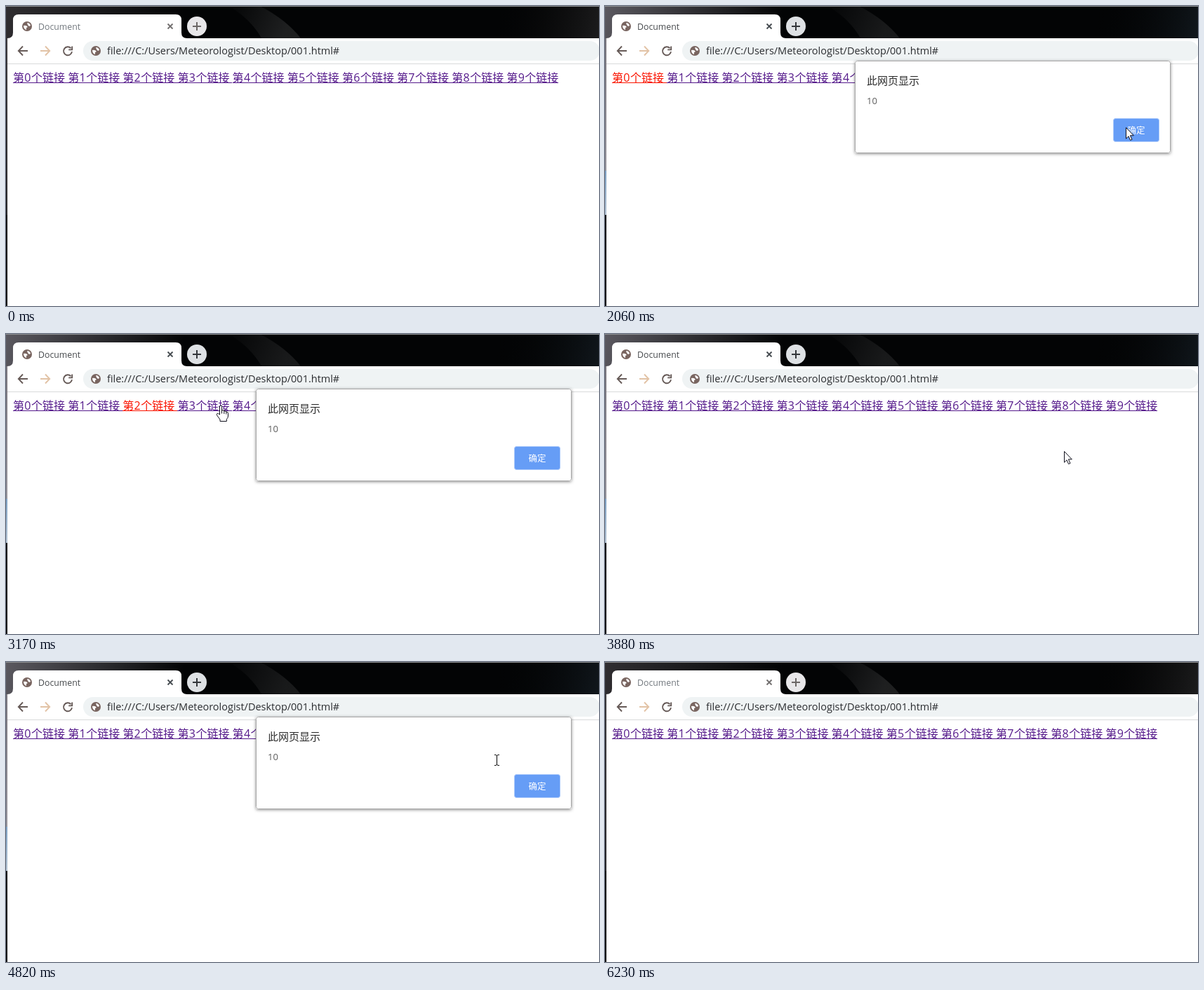
Recreate the animation shown at these times as an HTML page with a canvas. Size 845 px wide and 428 px high, loop 6.29 s.

```html
<!DOCTYPE html>
<html lang="zh">
<head>
<meta charset="utf-8">
<title>Document</title>
<style>
html, body { margin: 0; width: 100%; height: 100%; overflow: hidden; background: #fff; }
canvas { display: block; }
</style>
</head>
<body>
<canvas id="stage" width="845" height="428"></canvas>
<script>
const c = document.getElementById('stage').getContext('2d');
const LOOP = 6290, ENTER = 70, EXIT = 6080, BLUR = 6230;
const FADE = 190;
const LATIN = '"Open Sans", "Noto Sans", sans-serif';
const CJK = '"Noto Sans CJK SC", "Noto Sans CJK", sans-serif';
const LINK_X = 10, LINK_STEP = 78.15, LINK_Y = 101;
const OK = { x: 742, y: 173 };

// Each click on a link opens the dialog, each click on its button closes it
const visits = [
  { x: 63, open: 1260, close: 2200 },
  { x: 168, open: 2960, close: 3600 },
  { x: 526, open: 4370, close: 5120 },
  { x: 560, open: 5400, close: 5780 }
];

// The pointer enters, goes link - button for each visit, and leaves
const stops = [{ t: ENTER, x: 684, y: 407 }, { t: 670, x: 69, y: 128 }];
for (const { x, open, close } of visits) {
  stops.push(
    { t: open - 130, x, y: LINK_Y }, { t: open + 80, x, y: LINK_Y },
    { t: close - 150, ...OK }, { t: close, ...OK });
}
stops.push({ t: EXIT, x: 823, y: 428 });

const hand = new Path2D('M-1.5 13V1.5Q-1.5 0 0 0T1.5 1.5V7Q4.5 5.8 4.8 8Q7.6 7 7.9 9.2Q10.5 8.6 10.5 11.2V15Q10.5 17.5 8.4 19.5V22.5H-1V20L-5 14.6Q-6.6 12 -5 11.3Q-3.6 10.8 -1.5 13Z');
const arrow = new Path2D('M.5 .5V16.2L4 12.8L6.6 18.5L9 17.4L6.4 11.8H11.3Z');
const land = new Path2D('M-5 -1Q-1 -2 1 1L-1 2L-1 5Q-5 4 -5 -1ZM0 -5Q4 -5 5 -1L3 0L1 -2Z');

const clamp = v => Math.max(0, Math.min(1, v));
const mix = (a, b, u) => a + (b - a) * u;

function text(s, x, y, size, color, family = LATIN, weight = 400) {
  c.font = `${weight} ${size}px ${family}`;
  c.fillStyle = color;
  c.fillText(s, x, y);
}

function box(x, y, w, h, r, color) {
  c.beginPath();
  c.roundRect(x, y, w, h, r);
  c.fillStyle = color;
  c.fill();
}

function disc(x, y, r, color) {
  c.beginPath();
  c.arc(x, y, r, 0, Math.PI * 2);
  c.fillStyle = color;
  c.fill();
}

function line(d, color, width) {
  c.strokeStyle = color;
  c.lineWidth = width;
  c.stroke(new Path2D(d));
}

function fade(x0, y0, x1, y1, from, to) {
  const g = c.createLinearGradient(x0, y0, x1, y1);
  g.addColorStop(0, from);
  g.addColorStop(1, to);
  return g;
}

function globe(x, y) {
  c.save();
  c.translate(x, y);
  disc(0, 0, 7, '#796560');
  c.fillStyle = '#fff';
  c.fill(land);
  c.restore();
}

function backdrop(active) {
  c.fillStyle = fade(0, 0, 240, 60, active ? '#5b5960' : '#302e31', '#030405');
  c.fillRect(0, 0, 845, 46);
  c.fillStyle = fade(330, 0, 400, 30, '#ffffff04', active ? '#ffffff16' : '#ffffff1c');
  c.fill(new Path2D('M318 0Q350 20 364 46H420Q400 20 362 0Z'));
  c.fillStyle = fade(690, 0, 845, 30, '#00000000', active ? '#10161b' : '#1b1b1c');
  c.fillRect(690, 0, 155, 46);
  c.fillStyle = '#8c8e90';
  c.fillRect(0, 0, 845, 1);

  c.fillStyle = active ? '#131418' : '#09080b';
  c.fillRect(0, 46, 2, 382);
  c.fillStyle = active ? fade(0, 46, 0, 235, '#77747c', '#94929a') : fade(0, 46, 0, 298, '#39373a', '#252427');
  c.fillRect(0, 46, 2, 252);
  if (active) {
    c.fillStyle = fade(0, 235, 0, 298, '#7c9fc2', '#b0c0d0');
    c.fillRect(0, 235, 2, 63);
  }
}

function browser(active) {
  c.fillStyle = '#fff';
  c.fillRect(2, 46, 843, 382);
  c.fill(new Path2D('M2 46Q10 46 10 38V20Q10 12 18 12H242Q250 12 250 20V38Q250 46 258 46Z'));
  globe(30, 29);
  text('Document', 46, 34, 12.3, active ? '#46494c' : '#72787e');
  line('M230.5 25.5L237.5 32.5M237.5 25.5L230.5 32.5', active ? '#454b50' : '#716e6e', 1.8);
  disc(272, 29, 14, active ? '#dee1e4' : '#e8e7e9');
  line('M266 29H278M272 23V35', active ? '#34373b' : '#6c6766', 2);

  line('M31 64H18.5M24 57.5L17.8 64L24 70.5', '#665a57', 1.9);
  line('M49 64H61.5M56 57.5L62.2 64L56 70.5', '#e2c3a6', 1.9);
  line('M92.5 60.2A6 6 0 1 0 94 65.2M94.2 57.5V62.4H89.2', '#665a57', 1.9);
  box(110, 50, 736, 28, 14, '#eff3f4');
  globe(128, 64);
  text('file:///C:/Users/Meteorologist/Desktop/001.html#', 144, 69, 14.47, '#2b2d30');
  c.fillStyle = '#d9dadb';
  c.fillRect(2, 82, 843, 1);
}

function links(t) {
  const visit = visits.find(v => t >= v.open - 30 && t < v.close + FADE);
  const pressed = visit ? Math.floor((visit.x - LINK_X) / LINK_STEP) : -1;
  for (let i = 0; i < 10; i++) {
    const x = LINK_X + i * LINK_STEP;
    const color = i === pressed ? '#fa1400' : '#551a8b';
    text('第', x, 108, 16, color, CJK);
    text(i, x + 16.3, 108, 16, color);
    text('个链接', x + 26, 108, 16, color, CJK);
    c.fillRect(Math.round(x), 109, i < 9 ? LINK_STEP : 74, 1);
  }
}

function dialogLevel(t) {
  return Math.max(...visits.map(v =>
    Math.min(clamp((t - v.open) / FADE), clamp(1 - (t - v.close) / FADE))));
}

function dialog(p) {
  if (!p) return;
  c.save();
  c.globalAlpha = Math.pow(p, 1.1);
  c.translate(581, 144 - 18 * (1 - p));
  c.scale(1 + .008 * (1 - p), 1);
  c.translate(-581, -144);

  // Shadow only outside the box, so that the fading inside stays white
  c.save();
  c.beginPath();
  c.rect(340, 60, 482, 170);
  c.roundRect(356, 78, 450, 132, 3);
  c.clip('evenodd');
  c.shadowColor = 'rgba(0,0,0,.45)';
  c.shadowBlur = 4;
  c.shadowOffsetY = 1;
  box(356, 78, 450, 132, 3, '#fff');
  c.restore();

  box(356, 78, 450, 132, 3, '#fff');
  c.beginPath();
  c.roundRect(356.5, 78.5, 449, 131, 3);
  c.strokeStyle = '#a8a8a8';
  c.lineWidth = 1;
  c.stroke();
  text('此网页显示', 373, 112, 15, '#2c2c2c', CJK);
  text('10', 373, 140, 13, '#5c5c5c');
  box(724.5, 160.5, 65, 33, 3, '#669df6');
  c.strokeStyle = '#a9c8fb';
  c.stroke();
  text('确定', 744.5, 182, 12.5, '#fff', CJK, 500);
  c.restore();
}

function pointer(t, open) {
  if (t < ENTER || t >= EXIT) return;
  const i = stops.findIndex(s => s.t > t);
  const a = stops[i - 1], b = stops[i];
  const u = (t - a.t) / (b.t - a.t), e = u * u * (3 - 2 * u);
  // Sideways first, then down or up
  const x = Math.round(mix(a.x, b.x, e)), y = Math.round(mix(a.y, b.y, Math.pow(e, 2.8)));
  const inside = open && x > 356 && x < 806 && y > 78 && y < 210;

  c.save();
  c.translate(x, y);
  if (inside && y > 125 && y < 147) {
    line('M-3 -7.5H-1L.5 -6.5L2 -7.5H4M.5 -7V7M-3 7.5H-1L.5 6.5L2 7.5H4', '#000', 1);
  } else {
    const overLink = !inside && y > 92 && y < 113 && x < 788;
    const shape = overLink ? hand : arrow;
    c.fillStyle = '#fff';
    c.fill(shape);
    c.strokeStyle = '#10101c';
    c.lineWidth = 1;
    c.stroke(shape);
    if (overLink) line('M1.5 7V11.5M4.8 8V12M7.9 9.2V12.5', '#10101c', 1);
  }
  c.restore();
}

function draw(t) {
  const active = t >= visits[0].open - 120 && t < BLUR;
  const level = dialogLevel(t);
  backdrop(active);
  browser(active);
  links(t);
  dialog(level);
  pointer(t, level > .5);
}

const begin = performance.now();
function tick() {
  draw((performance.now() - begin) % LOOP);
  requestAnimationFrame(tick);
}
tick();
</script>
</body>
</html>
```
